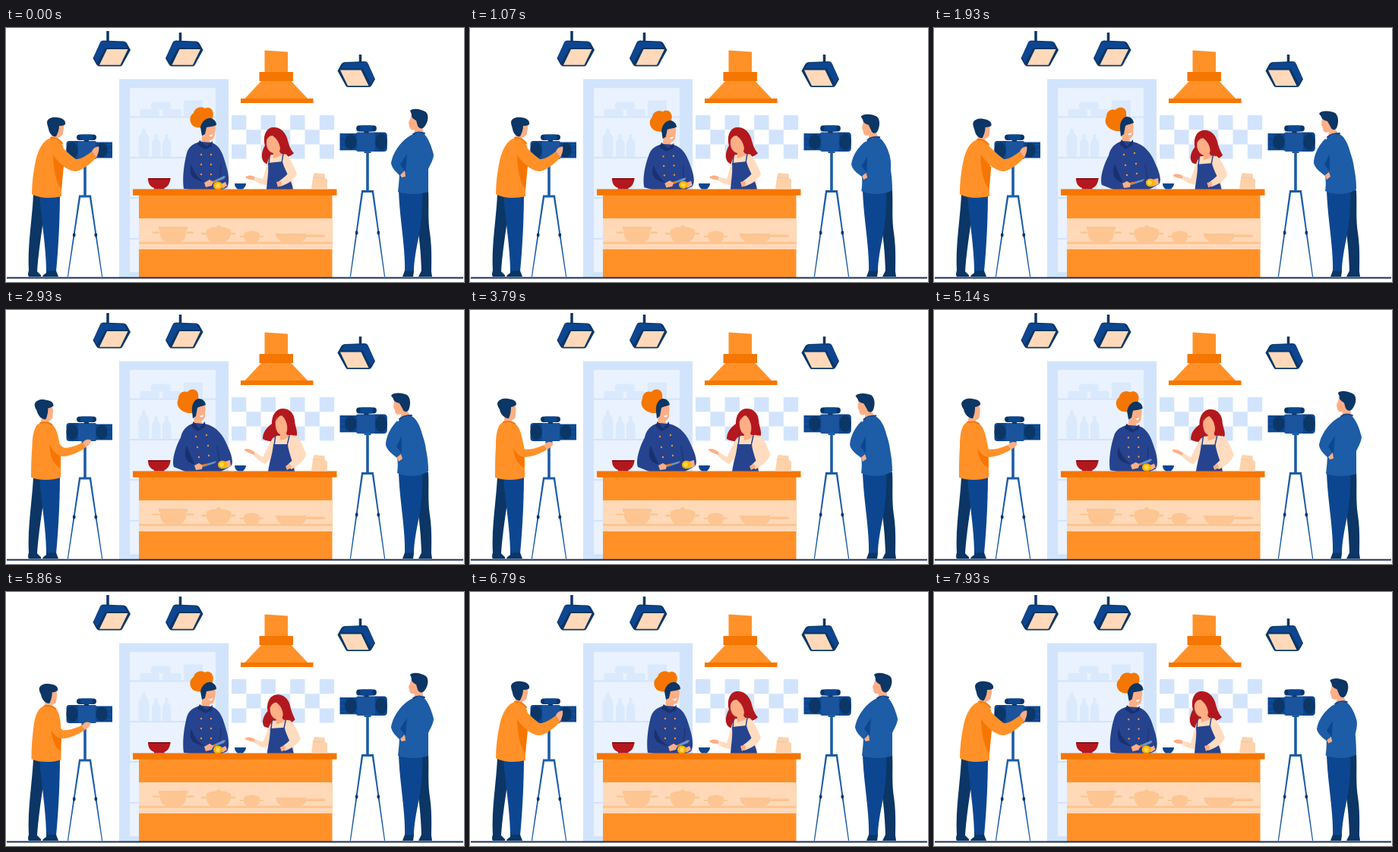
An HTML page that plays this animation: 603 by 335 pixels, repeating every 8 s.

```html
<!DOCTYPE html>
<html lang="en">
<head>
<meta charset="utf-8">
<title>Cooking show</title>
<style>
html, body { margin: 0; width: 100%; height: 100%; overflow: hidden; background: #fff }
svg { display: block; width: 100%; height: 100% }
</style>
</head>
<body>
<svg viewBox="0 0 603 335">
  <defs>
    <g id="lamp">
      <path fill="#0b3665" d="M124 19Q125 16.500 128 16.500L155 17.500Q158 18 159 20L164 29L153 49Q152 50.500 150 50.500H123Q120.500 50.500 119 48L114.500 40Z"/>
      <path fill="#0d4690" d="M125 18L155 18.500L159.500 26H131L120 46L115.500 39Z"/>
      <path fill="#ffd9ba" d="M133 28H160.500L150.500 48.700H123Z"/>
    </g>
    <g id="camera">
      <rect x="79.500" y="149" width="20" height="24" rx="4" fill="#0d4690"/>
      <ellipse cx="87" cy="161" rx="7.500" ry="10.500" fill="#0b3665"/>
      <rect x="95" y="149" width="24" height="24" rx="2" fill="#1a549c"/>
      <path fill="#0d4690" d="M118 150.500H140V171.500H118Z"/>
      <path stroke="#1a549c" d="M133 154H139M133 161H139M133 168H139"/>
      <ellipse cx="126" cy="161" rx="7.500" ry="9.500" fill="#0b3665"/>
      <path fill="#0b3665" d="M103 146H109V150H103Z"/>
      <rect x="93" y="140.500" width="26" height="7.500" rx="3.700" fill="#0b3665"/>
      <rect x="98" y="140.500" width="16" height="7.500" rx="2" fill="#0d4690"/>
    </g>
  </defs>

  <path fill="#d2e4fc" d="M149 67.500H293V329H149Z"/>
  <path fill="#e9f2fe" d="M163 79H276V322H163Z"/>
  <path stroke="#d2e4fc" stroke-width="2" d="M163 117.500H276M163 171H276M163 224H276M163 278H276"/>
  <g fill="#dbe9fd">
    <rect x="176" y="107" width="26" height="10" rx="4"/>
    <rect x="191" y="97.500" width="26" height="10" rx="4"/>
    <rect x="206" y="107" width="25" height="10" rx="4"/>
    <path d="M234 95.500H259V117H234Z"/>
    <path d="M179 133H184V138Q189 142 188.500 150V167Q188 170 185 170H178Q174.500 170 174.500 167V150Q174 142 179 138Z"/>
    <path id="bottle" d="M195.500 140H199.500V146Q203.500 149 203.500 154V170H192V154Q192 149 195.500 146Z"/>
    <use href="#bottle" x="14"/>
  </g>
  <path id="tiles" fill="#d2e4fc"/>

  <path fill="#ff9128" d="M340.500 29.500L371 31.500V58H340.500ZM336 70H375.500L397.500 93.500H314Z"/>
  <path fill="#f57600" d="M333.500 58H378V70H333.500ZM309 93H404.500V99H309Z"/>

  <path stroke="#0b3665" stroke-width="3.500" d="M134 4V18M229.500 6V18M466.500 35V46"/>
  <use href="#lamp"/><use href="#lamp" x="95.500"/>
  <use href="#lamp" transform="matrix(-1 0 0 1 600.500 27.500)"/>

  <g id="cooks"></g>

  <path fill="#ff9128" d="M175 220H429.500V329H175Z"/>
  <path fill="#ffd9b8" d="M175 251H429.500V292H175Z"/>
  <g fill="#fdc592">
    <path d="M175 282H429.500V285H175Z"/>
    <path d="M201 262H239V266H237.500C238 276 234 281 228 283H212C206 281 202 276 202.500 266H201ZM193 268.500H202V271H193ZM238 268.500H247V271H238Z"/>
    <path d="M264 266Q271 262 277 262.500Q278 260 280 260Q282 260 283 262.500Q289 262 296 266V271C295 278 291 281 287 283H272C267 281 264 277 264 271ZM257 270H264V272.500H257ZM296 270H302V272.500H296Z"/>
    <path d="M313 271Q323 264 334 271V275Q333 281 329 283H318Q313 280 313 275ZM308 274H313V276H308ZM334 274H339V276H334Z"/>
    <path d="M355 271H395V272.500H420V276H395Q393 281 387 283H365Q356 279 355 271Z"/>
  </g>
  <path fill="#f57600" d="M167 212.500H435.500V220.800H167Z"/>
  <path fill="#b3181e" d="M187 198H216.500C216 206 212 210 208.500 211V212.500H195V211C190 209 187 206 187 198Z"/>
  <path fill="#8c1116" d="M187 198H216.500L216 200H187.500Z"/>
  <path fill="#0d4690" d="M301 205H316C316 209 313 211 312 212.500H305C303 211 301 209 301 205Z"/>
  <path fill="#fdd2ab" d="M406 191L420 192.500L419.500 197L423 200V212.500H402L404 197Z"/>
  <path stroke="#fdc592" d="M404 197L419 198" fill="none"/>

  <use href="#camera"/>
  <use href="#camera" transform="matrix(-1.030 0 0 1.060 583.700 -20.500)"/>
  <g id="tripods" fill="#1d5ca6"></g>

  <path fill="#0b3665" d="M36 218L54 220C50 250 43 290 41 321L46 326V328H30Q28 325 30 320C28 285 35 250 36 218Z"/>
  <path fill="#0d4690" d="M44 220H71C71 250 69 290 66 321H53C53 290 46 250 44 220Z"/>
  <path fill="#0b3665" d="M53 320.500L66 320L69 328H48Q48 326 53 323Z"/>
  <path fill="#0b3665" d="M538 214H556C557 235 555 250 558 270C561 290 560 310 560 321L561 328H543L547 320C546 290 543 265 538 240Z"/>
  <path fill="#0d4690" d="M517 214H548C549 235 547 255 544 272C540 292 537 308 537 321H525C526 290 518 250 517 214Z"/>
  <path fill="#0b3665" d="M525 320L537 321L536 328H522Z"/>
  <g id="crew"></g>
  <path stroke="#1a2f5a" stroke-width="2" d="M1 329.500H602"/>
</svg>
<script>
const $ = id => document.getElementById(id);
const svgNode = (tag, parent, attrs) => {
  const node = document.createElementNS('http://www.w3.org/2000/svg', tag);
  for (const key in attrs) node.setAttribute(key, attrs[key]);
  return parent.appendChild(node);
};

let tiles = '';
for (let i = 0; i < 21; i += 2)
  tiles += `M${297 + i % 7 * 19.3} ${115 + (i / 7 | 0) * 19.2}h19.3v19.2h-19.3z`;
$('tiles').setAttribute('d', tiles);

function tripod(x, top, bar, knee) {
  const add = d => svgNode('path', $('tripods'), { d });
  add(`M${x - 1.8} ${top}h3.6V${bar}h-3.6zM${x - 4.5} ${top}h9v3h-9zM${x - 8} ${bar - 0.5}h16v3h-16z`);
  for (const side of [-1, 1]) {
    add(`M${x + side * 5.5} ${bar}L${x + side * 8} ${bar}L${x + side * 23.2} 328L${x + side * 22} 328z`);
    svgNode('ellipse', $('tripods'), { cx: x + side * 14.3, cy: knee, rx: 1.9, ry: 2.7, fill: '#0b3665' });
  }
}
tripod(104, 173, 221, 273);
tripod(476, 162, 214.500, 270);

const SKIN = '#ffae85', SHIRT = '#ffdcbf', NAVY = '#0b3665', BLUE = '#0d4690', MID = '#1d5ca6';
const INDIGO = '#26438f', SHADE = '#1a3170', ORANGE = '#ff9128', RUST = '#f57600', RED = '#b3181e';

// Each part: colour, first pose, second pose, optional stroke width.
const actors = [
  { layer: 'cooks', start: 1350, end: 3000, dip: 5, parts: [
    [RED, 'M351 131C341 132 338 145 341 155C336 163 335 174 341 178C347 182 356 178 362 170C370 172 376 168 379 165C374 160 372 152 370 145C367 136 360 130 351 131Z',
      'M364 130C353 131 350 142 350 150C342 156 338 162 338 170C345 174 352 174 362 171C370 174 378 172 383 165C384 158 380 152 380 145C379 136 373 130 364 130Z'],
    [SHIRT, 'M349 167C343 175 344 190 344 212L378 212C377 200 376 195 374 180C372 170 370 166 364 166Z',
      'M355 166C348 172 346 185 347 212L380 212C382 200 384 190 384 180C385 170 382 165 376 165Z'],
    [SKIN, 'M343 149C344 141 352 138 358 141C362 148 362 158 360 163L364 168L352 172L352 165C346 164 342 157 343 149Z',
      'M355 145C357 137 364 135 369 138C372 148 371 158 369 163L373 168L361 172L361 164C356 162 354 153 355 145Z'],
    [RED, 'M343 148C344 135 358 133 363 141C367 150 366 160 361 164C362 154 357 146 351 142C347 142 345 144 343 148Z',
      'M355 147C356 136 364 134 370 138C374 146 374 156 371 163C371 152 369 144 363 139C359 140 357 143 355 147Z'],
    [SHIRT, 'M346 172C342 182 341 192 338 199L325 196L323 199C330 204 338 207 343 207C348 200 350 190 351 180Z',
      'M352 168C346 176 342 188 338 194L325 186L323 189C330 196 337 202 342 203C348 196 353 186 355 178Z'],
    [SKIN, 'M327 196C322 194 318 194 315 197C318 200 322 200 327 200Z', 'M327 187C321 183 317 182 313 184C317 188 322 189 327 191Z'],
    [INDIGO, 'M345 178L364 176C366 186 376 200 378 213L343 213C344 200 346 190 345 178Z',
      'M352 177L371 177C372 188 378 200 380 213L345 213C347 200 351 190 352 177Z'],
    [INDIGO, 'M346 180L347 168M363 178L365 166', 'M353 179L355 165M370 179L373 166', 1.5],
    [SHIRT, 'M368 166C374 170 380 185 383 192C381 200 370 206 361 209L357 204C362 200 368 196 371 192C369 186 366 178 366 172Z',
      'M380 165C386 167 392 180 395 190C394 198 386 204 376 210L369 206C374 201 380 196 383 191C380 185 378 178 377 172Z'],
    [SKIN, 'M356 203L362 202L363 207L358 210Z', 'M368 206L374 203L376 208L370 211Z']
  ] },
  { layer: 'cooks', start: 480, end: 1950, dip: 4, parts: [
    [RUST, 'M251 131C242 130 239 117 247 112C249 104 258 103 262 106C269 102 275 110 272 118C272 122 269 123 266 123C263 125 261 128 260 132Z',
      'M242 136C231 136 222 126 227 117C227 109 234 106 239 108C244 102 254 105 253 113C254 117 253 119 251 119C249 123 248 130 248 136Z'],
    [SKIN, 'M258 128L270 122C276 124 277 132 275 138C275 145 272 148 268 148L269 156L256 154C259 146 258 140 258 128Z',
      'M246 132L256 121C262 122 264 128 262 135C263 142 261 145 257 146L259 155L246 153C249 146 247 140 246 132Z'],
    [NAVY, 'M256 131C258 122 265 118 270 119C275 121 277 124 277 128C273 130 268 130 264 131L262 140L258 142Z',
      'M245 134C244 124 249 117 254 117C259 117 262 120 263 125C259 127 255 127 252 129L250 140L246 143Z'],
    ['#fff', 'M267 142L272 140C272 144 269 144 267 142Z', 'M255 140L260 138C260 142 257 142 255 140Z'],
    [INDIGO, 'M256 150C248 152 241 155 238 165C234 180 232 200 234 212L242 213L285 213L291 210C294 205 294 195 290 182C286 168 283 156 271 151Z',
      'M248 149C238 152 232 158 230 168C222 183 218 200 221 207L236 213L283 213L296 206C299 203 299 195 292 180C286 165 278 154 262 150Z'],
    [SHADE, 'M255 148L264 156L272 149L271 156L262 160L252 154Z', 'M247 147L254 156L262 147L262 154L252 160L244 153Z'],
    [SHADE, 'M244 180C241 190 241 200 262 203C252 198 247 190 244 180Z', 'M238 179C234 190 235 201 249 204C245 196 241 188 238 179Z'],
    [SHADE, 'M283 180L281 200', 'M278 180L281 199', 1],
    [ORANGE, 'M257 167L257 167M270 167L270 167M257 180L257 180M270 180L270 180M257 193L257 193M270 193L270 193',
      'M250 167L250 167M264 165L264 165M252 181L252 181M266 179L266 179M254 194L254 194M267 192L267 192', 2.4],
    ['#6f93c4', 'M268 204L287 195L289 196L287 199L272 205Z', 'M256 205L274 200L277 199L275 202L260 207Z'],
    [RUST, 'M267 205L275 202', 'M255 206L263 204', 2.4],
    [SKIN, 'M261 204L268 200L273 203L271 208L263 210Z', 'M248 205L254 202L259 205L258 210L250 211Z'],
    [SKIN, 'M283 206L289 203L291 208L285 212Z', 'M288 200L295 198L296 206L288 209Z'],
    ['#ffb400', 'M273 208C273 201 285 201 285 208C285 215 273 215 273 208Z', 'M279 204C279 197 291 197 291 204C291 211 279 211 279 204Z'],
    ['#ffd84a', 'M276 208C276 204 282 204 282 208C282 212 276 212 276 208Z', 'M281 204C281 200 287 200 287 204C287 208 281 208 281 204Z']
  ] },
  { layer: 'crew', start: 1500, end: 3250, dip: 4, parts: [
    [SKIN, 'M61 136L70 124C77 124 77 130 75 138C75 142 71 144 69 144L70 152L58 150Z',
      'M46 139L54 123C61 123 61 130 60 139C60 143 57 145 55 145L57 152L44 150Z'],
    [NAVY, 'M54 124C55 118 63 117 68 118C76 119 79 123 78 127C76 129 73 129 70 129C70 134 68 139 66 143C61 144 57 139 56 133C55 129 54 127 54 124Z',
      'M36 123C38 117 45 116 50 117C58 118 61 120 61 125C58 127 56 128 54 128C54 133 53 139 51 143C45 143 40 137 39 131C37 128 36 126 36 123Z'],
    [ORANGE, 'M59 145C50 147 43 158 39 175C36 190 34 205 34 219C44 225 60 225 73 222C73 208 74 195 74 182C78 165 76 151 70 148Z',
      'M44 148C36 150 34 165 34 180C33 195 33 208 33 221C44 225 60 225 72 221C72 208 73 195 71 180C68 163 64 150 57 149Z'],
    [RUST, 'M59 145C64 144 70 147 74 152', 'M44 148C49 147 55 147 59 150', 2],
    [RUST, 'M62 163L76 182L73 213C66 205 62 185 62 163Z', 'M57 178L71 187L71 208C62 203 57 193 57 178Z']
  ] },
  { layer: 'crew', start: 1950, end: 3320, dip: 0, parts: [
    [ORANGE, 'M62 152C70 150 80 165 92 173C99 173 106 168 113 163L119 171C110 180 100 188 92 189C80 189 66 175 61 165Z',
      'M58 164C62 166 66 182 73 184C82 184 90 181 98 178L101 184C92 190 80 194 72 194C64 194 58 186 56 178Z'],
    [SKIN, 'M113 163C115 158 118 157 122 156C123 160 122 164 119 171Z', 'M98 178C101 174 104 173 109 175C110 178 107 181 101 184Z']
  ] },
  { layer: 'crew', start: 70, end: 1650, dip: 6, parts: [
    [SKIN, 'M534 115L546 118L548 131L550 139L537 141L538 134C534 135 531 133 531 129L530 125Z',
      'M511 119L523 121L528 133L533 140L519 145L520 137C515 139 512 137 512 132L510 128Z'],
    [NAVY, 'M532 109C536 105 547 107 553 111C557 115 556 124 551 130C548 134 544 133 542 129L540 122C536 120 533 117 534 114Z',
      'M507 113C510 108 522 109 528 112C533 116 533 125 530 132C527 136 523 134 522 130L518 123C514 122 510 120 510 117Z'],
    [MID, 'M538 139C525 146 519 152 517 165C519 185 518 200 516 216C528 220 545 220 556 216C556 205 556 195 556 186C560 178 563 172 563 167C560 155 556 145 549 138Z',
      'M520 143C512 150 510 160 511 172C515 188 517 202 515 215C528 221 545 220 556 213C556 202 555 195 553 184C552 176 550 170 548 164C545 152 540 142 532 139Z'],
    [BLUE, 'M536 140C540 137 546 137 551 139', 'M518 144C522 140 528 139 534 139', 2],
    [MID, 'M534 141C520 148 509 165 507 178C508 186 516 192 521 197L526 189C523 186 521 183 519 180C524 172 530 162 532 156Z',
      'M515 146C506 155 500 168 500 178C502 186 510 191 515 195L521 188C518 186 516 183 514 180C518 173 522 165 523 158Z'],
    [BLUE, 'M519 180L528 166L526 190Z', 'M514 180L521 166L521 189Z'],
    [SKIN, 'M519 194L525 188L526 196L521 197Z', 'M515 194L520 190L522 196L517 200Z']
  ] }
];

for (const actor of actors)
  for (const part of actor.parts) {
    const [color, , , width] = part;
    part.node = svgNode('path', $(actor.layer), width
      ? { fill: 'none', stroke: color, 'stroke-width': width, 'stroke-linecap': 'round' }
      : { fill: color });
  }

const clamp = v => Math.max(0, Math.min(1, v));
const ease = v => (v = clamp(v), v * v * (3 - 2 * v));

// Blend two paths; the dip lowers the upper body and fades out at the waist.
function blend(from, to, p, dip) {
  const target = to.match(/[\d.]+/g);
  let i = 0;
  return from.replace(/[\d.]+/g, v => {
    const n = +v + (target[i] - v) * p;
    return (i++ % 2 ? n + dip * clamp((212 - n) / 70) : n).toFixed(2);
  });
}

const LOOP = 8000, STEP = 1000 / 14, CYCLE = 100 * STEP;

function draw(now) {
  const t = Math.floor((now % LOOP + 2) / STEP) * STEP % LOOP % CYCLE;
  for (const { start, end, dip, parts } of actors) {
    const at = time => ease((time - start) / (end - start));
    const p = at(t) - at(t - CYCLE / 2);
    for (const part of parts)
      part.node.setAttribute('d', blend(part[1], part[2], p, dip * 4 * p * (1 - p)));
  }
  requestAnimationFrame(draw);
}
draw(0);
</script>
</body>
</html>
```
